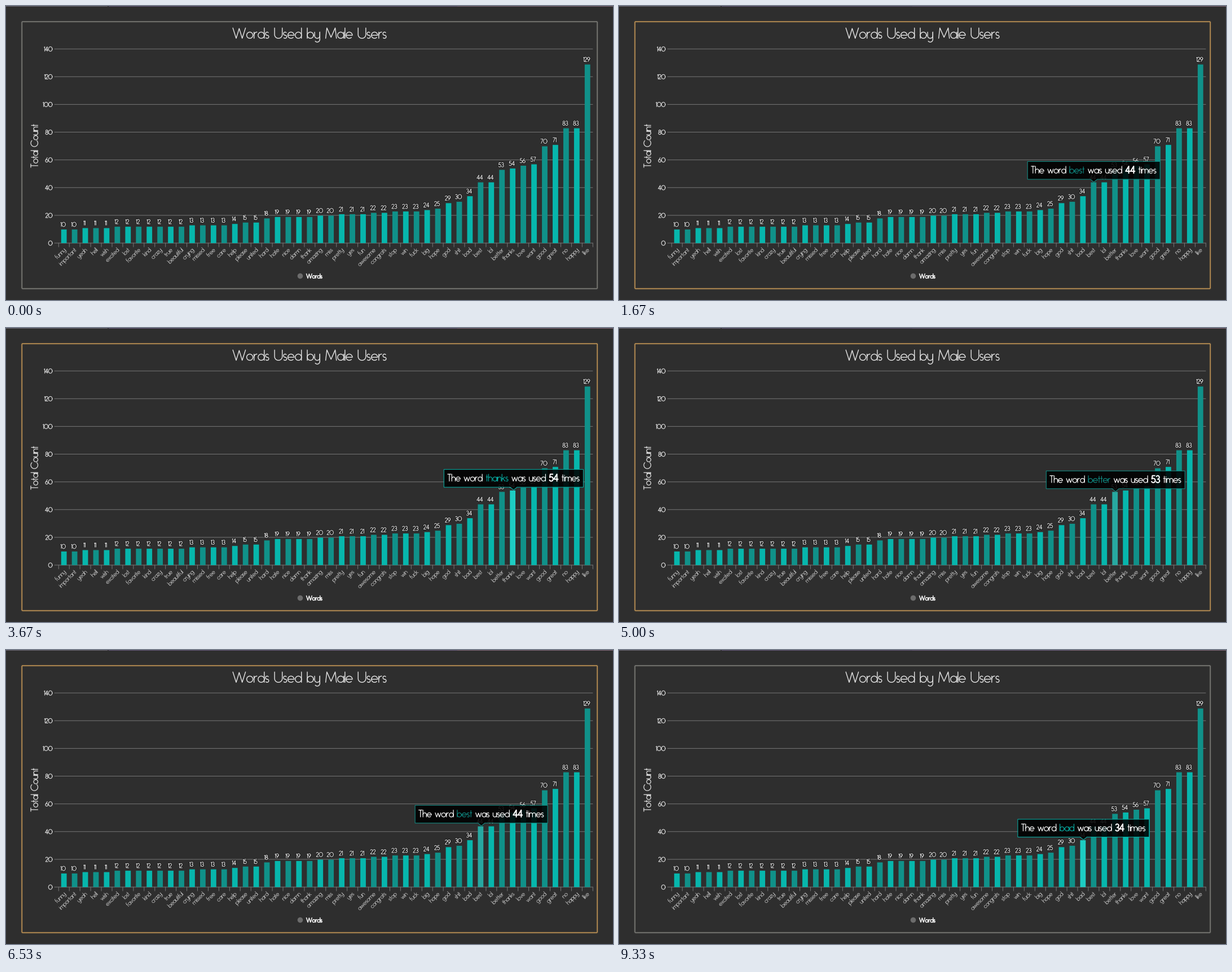
Animation of 1076 by 521 pixels, one loop 9.39 s. Source, as a matplotlib script:

```python
import numpy as np
import matplotlib.pyplot as plt
from matplotlib.animation import FuncAnimation
from matplotlib.collections import LineCollection
from matplotlib.patches import Circle, FancyBboxPatch, Polygon

W, H, DPI = 1076, 521, 64
PX = 72 / DPI
STEP, FRAMES = 30, 313

BG = "#2e2e2e"
BRIGHT = np.array([7, 182, 172]) / 255
DARK = np.array([16, 145, 137]) / 255
GREY = np.array([130, 130, 125]) / 255
GOLD = np.array([203, 156, 88]) / 255

WORDS = """funny important yeah hell wish excited lost favorite kind crazy true
beautiful crying missed free care help please united hard hate nice damn thank
amazing miss pretty yes fun awesome congrats stop win fuck big hope god shit bad
best lol better thanks love want good great no happy like""".split()
COUNTS = ([10] * 2 + [11] * 3 + [12] * 7 + [13] * 4 + [14, 15, 15, 18] + [19] * 4
          + [20] * 2 + [21] * 3 + [22] * 2 + [23] * 3
          + [24, 25, 29, 30, 34, 44, 44, 53, 54, 56, 57, 70, 71, 83, 83, 129])

# (start, word, hover end) in ms
STOPS = [(850, "awesome", 1150), (1200, "best", 1650), (1730, "better", 1900),
         (2130, "love", 2350), (3400, "thanks", 4150), (4300, "better", 5900),
         (6130, "best", 7200), (7400, "bad", 9999)]


# Thin geometric lettering: cap height 1, round bowls as tall as X.
def ln(*v):
    return np.array(v, float).reshape(-1, 2)


def arc(cx, cy, rx, ry, a=0, b=360):
    t = np.radians(np.linspace(a, b, 20))
    return np.column_stack([cx + rx * np.cos(t), cy + ry * np.sin(t)])


X = .6
R = X / 2


def bowl(a=0, b=360):
    return arc(R, R, R, R, a, b)


def stem(x, top, bottom=0):
    return ln(x, bottom, x, top)


def hump(x, w):
    h = w / 2
    return np.vstack([arc(x + h, X - h, h, h, 180, 0), ln(x + w, 0)])


def cup(w, top):
    h = w / 2
    return np.vstack([ln(0, top), arc(h, h, h, h, 180, 360), ln(w, top)])


ROUND = {
    "a": [bowl(), stem(X, X)],
    "b": [bowl(), stem(0, 1)],
    "c": [bowl(45, 315)],
    "d": [bowl(), stem(X, 1)],
    "e": [bowl(0, 315), ln(0, R, X, R)],
    "g": [bowl(), stem(X, X, -.06), arc(R, -.06, R, .27, 0, -150)],
    "o": [bowl()],
    "p": [bowl(), stem(0, X, -.36)],
    "s": [arc(.16, .45, .15, .15, 40, 270), arc(.16, .15, .16, .15, 90, -140)],
}
STEMMED = {
    "f": [np.vstack([ln(.1, 0), arc(.25, .83, .15, .17, 180, 75)]),
          ln(0, X, .25, X)],
    "h": [stem(0, 1), hump(0, .5)],
    "i": [stem(0, X), stem(0, .85, .8)],
    "k": [stem(0, 1), ln(.4, X, 0, .26), ln(.13, .36, .44, 0)],
    "l": [stem(0, 1)],
    "m": [stem(0, X), hump(0, .44), hump(.44, .44)],
    "n": [stem(0, X), hump(0, .5)],
    "r": [stem(0, X), arc(.28, .32, .28, .28, 180, 90)],
    "t": [stem(.12, .92), ln(0, X, .25, X)],
    "u": [cup(.5, X), stem(.5, X)],
    "v": [ln(0, X, .25, 0, .5, X)],
    "w": [ln(0, X, .2, 0, .4, .56, .6, 0, .8, X)],
    "x": [ln(0, 0, .46, X), ln(0, X, .46, 0)],
    "y": [cup(.5, X), stem(.5, X, -.1), arc(.25, -.1, .25, .26, 0, -140)],
    "z": [ln(0, X, .44, X, 0, 0, .44, 0)],
}
CAPS = {
    "C": [arc(.5, .5, .5, .5, 45, 315)],
    "M": [ln(0, 0, .12, 1, .52, .1, .92, 1, 1.04, 0)],
    "T": [ln(0, 1, .5, 1), stem(.25, 1)],
    "U": [cup(.74, 1)],
    "W": [ln(0, 1, .32, 0, .61, .95, .9, 0, 1.22, 1)],
}
DIGITS = {
    "0": [arc(.42, .5, .42, .5)],
    "1": [ln(0, .86, .14, 1, .14, 0)],
    "2": [np.vstack([arc(.25, .74, .25, .26, 170, -30), ln(0, 0, .52, 0)])],
    "3": [arc(.26, .75, .22, .25, 150, -90), arc(.26, .25, .26, .25, 90, -150)],
    "4": [ln(.44, 0, .44, 1, 0, .28, .6, .28)],
    "5": [np.vstack([ln(.48, 1, .12, 1), arc(.25, .31, .28, .31, 135, -150)])],
    "6": [arc(.28, .29, .28, .29), ln(.4, 1, .04, .44)],
    "7": [ln(0, 1, .5, 1, .12, 0)],
    "8": [arc(.27, .76, .21, .24), arc(.27, .26, .27, .26)],
    "9": [arc(.28, .71, .28, .29), ln(.16, 0, .52, .56)],
}
GLYPHS = {**ROUND, **STEMMED, **CAPS, **DIGITS}
WIDTH = {c: max(s[:, 0].max() for s in g) for c, g in GLYPHS.items()}
GAP, SPACE = .11, .45


def advance(text):
    return sum(WIDTH.get(c, SPACE - GAP) + GAP for c in text)


def write(text, x, y, size, align=0., angle=0.):
    """Strokes of text in stage pixels; align 0 left, .5 centre, 1 right."""
    pen = -align * (advance(text) - GAP)
    c, s = np.cos(np.radians(angle)), np.sin(np.radians(angle))
    out = []
    for ch in text:
        for p in GLYPHS.get(ch, []):
            u, v = (p[:, 0] + pen) * size, p[:, 1] * size
            out.append(np.column_stack([x + u * c - v * s, y - u * s - v * c]))
        pen += advance(ch)
    return out


fig = plt.figure(figsize=(W / DPI, H / DPI), dpi=DPI, facecolor=BG)
ax = fig.add_axes([0, 0, 1, 1])
ax.set_xlim(0, W)
ax.set_ylim(H, 0)
ax.axis("off")


def strokes(segs, color, width, z):
    lc = LineCollection(segs, colors=[color], linewidths=width * PX, snap=False,
                        capstyle="round", joinstyle="round", zorder=z)
    return ax.add_collection(lc, autolim=False)


def cx(i):
    return 93 + 18.94 * (i + .5)


def top(n):
    return 420 - n * 2.457


# Sliver of the page above
for x0, x1, col in [(0, 180, "#6b6672"), (180, 182, "#3a3840"),
                    (182, 520, "#65597a"), (520, 800, "#6f6080"),
                    (800, W, "#82697a")]:
    ax.fill_between([x0, x1], 0, 1, color=col, lw=0)

# Panel frame
frame = []
for width, alpha in [(4, .12), (1.4, 1)]:
    box = FancyBboxPatch((28.2, 27.7), 1020, 473.2, fill=False, alpha=alpha,
                         boxstyle="round,pad=0,rounding_size=1.5",
                         lw=width * PX, ec=GREY, snap=False)
    frame.append(ax.add_patch(box))

# Grid, ticks and axis captions
grid = [ln(86, top(v) + .1, 1040, top(v) + .1) for v in range(0, 141, 20)]
grid += [ln(x, 420, x, 427) for x in 93.3 + 18.94 * np.arange(51)]
strokes(grid, "#777777", 1, 1)

numbers = []
for v in range(0, 141, 20):
    numbers += write(str(v), 82, top(v) + 4.2, 8, 1)

base = [BRIGHT if i % 2 == 0 else DARK for i in range(len(WORDS))]
bars = ax.bar([cx(i) + .2 for i in range(len(WORDS))],
              [top(n) - 419.6 for n in COUNTS], 9.8, bottom=420.2,
              color=base, lw=0, zorder=2, snap=False)

names, values = [], []
for i, (word, n) in enumerate(zip(WORDS, COUNTS)):
    names += write(word, cx(i) + 3.5, 433.5, 7.8, 1, 45)
    values += write(str(n), cx(i) - 1.3, top(n) - 4.5, 7.8, .5)

strokes(values, "#1c1c1c", 3, 3)
strokes(values, "#e2e2e2", 1, 4)
strokes(numbers, "#dcdcdc", 1.1, 4)
strokes(names, "#b8b8b8", .8, 4)
strokes(write("Words Used by Male Users", 538, 57.3, 18.4, .5), "#e6e6e6", 1.4, 4)
strokes(write("Total Count", 56.5, 248, 12.5, .5, 90), "#e6e6e6", 1.2, 4)
ax.add_patch(Circle((521.5, 478.5), 4.8, color="#6c6c6c", lw=0))
strokes(write("Words", 532.5, 482.5, 8), "#f4f4f4", 1.5, 4)

# Tooltip
TIP = 12.3
callout = ax.add_patch(Polygon(ln(0, 0, 1, 0, 1, 1), fc=(0, 0, 0, .88),
                               lw=PX, zorder=6, snap=False))
plain = strokes([], "white", 1.2, 7)
accent = strokes([], DARK, 1.1, 7)
heavy = strokes([], "white", 2, 7)
tip_parts = [callout, plain, accent, heavy]


def tip_state(t):
    """Current word, eased anchor point and whether its bar is lit."""
    idx, pos, lit = None, None, False
    ends = [s[0] for s in STOPS[1:]] + [STEP * FRAMES]
    for (start, word, off), end in zip(STOPS, ends):
        if t < start:
            break
        idx = WORDS.index(word)
        goal = np.array([cx(idx), top(COUNTS[idx])])
        pos = goal if pos is None else pos
        pos = goal + (pos - goal) * (2 / 3) ** ((min(t, end) - start) / 32)
        lit = start + 100 < t < off
    return idx, pos, lit


def draw_tip(idx, pos):
    parts = [("The word ", plain), (WORDS[idx], accent), (" was used ", plain),
             (str(COUNTS[idx]), heavy), (" times", plain)]
    width = advance("".join(p for p, _ in parts)) * TIP + 12.5
    x, y = pos[0] + 1.2 - width / 2, pos[1] - 36.5
    m, b = pos[0] + 1.2, y + 31.5
    callout.set_xy(ln(x, y, x + width, y, x + width, b, m + 6, b,
                      m, b + 5, m - 6, b, x, b))
    callout.set_edgecolor(base[idx])
    accent.set_color([base[idx]])
    pen, segs = x + 6.5, {id(p): [] for p in tip_parts[1:]}
    for text, part in parts:
        segs[id(part)] += write(text, pen, y + 20.7, TIP)
        pen += advance(text) * TIP
    for part in tip_parts[1:]:
        part.set_segments(segs[id(part)])


def ramp(t, start, length=200):
    return min(max((t - start) / length, 0), 1)


def update(k):
    t = k * STEP
    mix = ramp(t, 600) - ramp(t, 8750)
    for box in frame:
        box.set_edgecolor(GREY + (GOLD - GREY) * mix)
    idx, pos, lit = tip_state(t)
    for i, bar in enumerate(bars):
        bar.set_facecolor(base[i] + .09 * (lit and i == idx))
    for part in tip_parts:
        part.set_visible(idx is not None)
    if idx is not None:
        draw_tip(idx, pos)
    return frame + tip_parts + list(bars)


anim = FuncAnimation(fig, update, frames=FRAMES, interval=STEP, repeat=True,
                     repeat_delay=0, blit=False)
plt.show()
```
